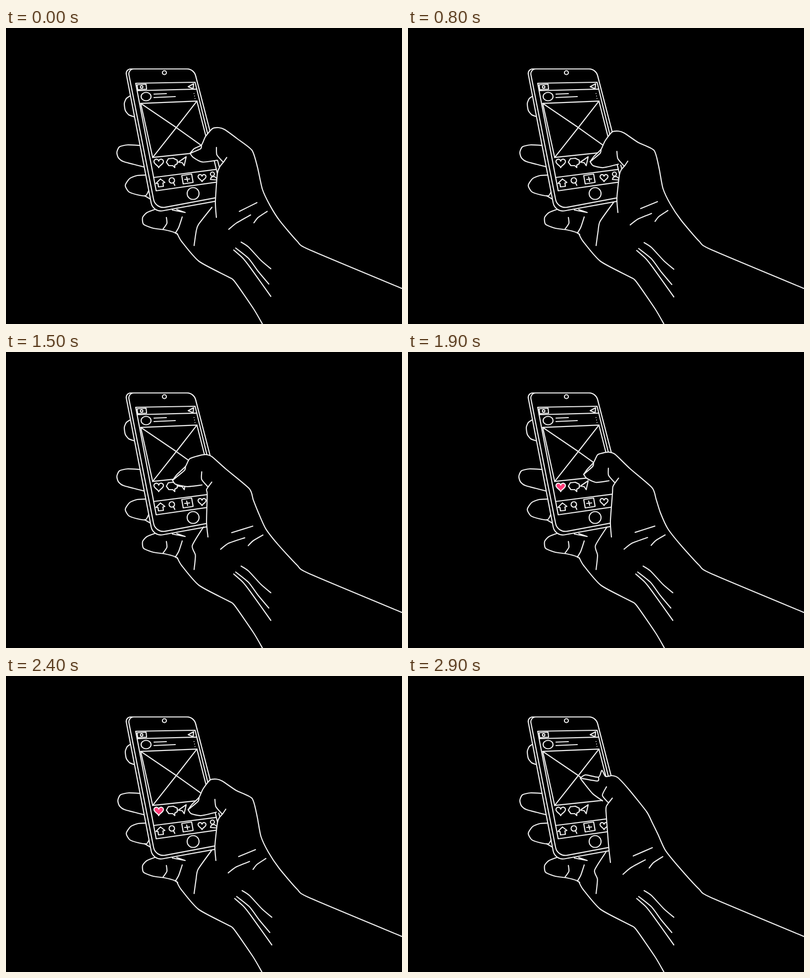
These frames come from a looping animation (800x600 px, 3 s). An HTML page with a canvas:

```html
<!DOCTYPE html>
<html lang="en">
<head>
<meta charset="utf-8">
<title>Scrolling hand</title>
<style>
  html, body { margin: 0; width: 100%; height: 100%; overflow: hidden; background: #000; }
  canvas { display: block; }
</style>
</head>
<body>
<canvas id="stage" width="800" height="600"></canvas>
<script>
const ctx = document.getElementById('stage').getContext('2d');
const INK = '#f0f0f0', PINK = '#ff3b78', STEP = 100, COUNT = 30, PITCH = 173;

const points = s => s.split(' ').map(p => p.split(',').map(Number));
const mix = (a, b, k) => a + (b - a) * k;

// The hand is drawn once, at rest.
const HAND = {
  top: points('368,271 376,260 390,246 398,229 412,211 425,209 437,213 465,232 497,248 507,283 515,325 530,357 552,390'),
  under: points('368,271 374,279 394,283 425,276'),
  palm: points('438,279 431,287 427,298 422,345 424,374')
};
const CREASES = ['422,250 424,265 436,279', '444,270 438,279', '368,271 388,254 390,246', '470,366 504,352',
  '449,399 465,387 492,376', '499,392 507,382 525,370', '415,354 388,392 384,412 380,441'].map(points);
const ARM = points('588,432 612,449 800,528');
const WRIST = '346,417 355,433 390,473 450,505 462,514 500,569 518,600';
const TENDONS = ['475,434 490,444 515,471 535,488', '460,450 478,466 493,485 535,544',
  '464,446 490,467 510,494 531,519'];
const FINGERS = [
  '250,138 243,143 239,153 241,167 248,176 259,180',
  '271,238 245,237 229,241 224,252 227,263 238,271 280,282',
  '284,298 265,299 250,305 241,319 248,332 265,338 282,340 288,330'
];

// Handles: tip, bend, knuckle, back, shoulder, wrist, web, palm, heel.
const POSES = {
  rest:   points('368,271 390,246 425,209 465,232 497,248 515,325 430,277 427,298 424,374'),
  settle: points('372,254 395,237 430,202 468,225 497,248 518,327 432,269 427,295 425,384'),
  swipe:  points('348,234 378,224 411,207 452,233 484,268 508,324 399,262 407,290 412,375'),
  high:   points('348,207 385,205 412,202 447,231 482,275 505,321 398,254 400,275 409,378'),
  reach:  points('355,248 375,224 406,203 448,236 493,275 510,326 411,262 413,287 411,375'),
  press:  points('318,272 350,240 402,213 440,238 490,279 510,326 391,279 400,290 405,375')
};
const ANCHORS = [ARM[0], [380, 441]];
const KEYS = [[0, 'settle'], [1, 'rest'], [2, 'rest'], [4, 'swipe'], [6, 'high'], [7, 'settle'],
  [8, 'rest'], [12, 'rest'], [14, 'reach'], [16, 'press'], [18, 'press'], [19, 'reach'],
  [21, 'rest'], [25, 'rest'], [27, 'swipe'], [29, 'high'], [30, 'settle']];

function poseAt(f) {
  const i = KEYS.findIndex((key, n) => f < KEYS[n + 1][0]);
  const [from, a] = KEYS[i], [to, b] = KEYS[i + 1], k = (f - from) / (to - from);
  return POSES[a].map(([x, y], n) => [mix(x, POSES[b][n][0], k), mix(y, POSES[b][n][1], k)]);
}

// Near handles drag a point along with them; anchors hold it back.
function warp(path, pose) {
  const rest = POSES.rest.concat(ANCHORS), now = pose.concat(ANCHORS);
  return path.map(([x, y]) => {
    let dx = 0, dy = 0, sum = 0;
    rest.forEach(([hx, hy], i) => {
      const w = 1 / (Math.hypot(x - hx, y - hy) ** 4 + 1e-6);
      dx += w * (now[i][0] - hx);
      dy += w * (now[i][1] - hy);
      sum += w;
    });
    return [x + dx / sum, y + dy / sum];
  });
}

function trace(pts, join) {
  if (join) ctx.lineTo(...pts[0]); else ctx.moveTo(...pts[0]);
  for (let i = 0; i < pts.length - 1; i++) {
    const b = pts[i], c = pts[i + 1], a = pts[i - 1] || b, d = pts[i + 2] || c;
    ctx.bezierCurveTo(b[0] + (c[0] - a[0]) / 9, b[1] + (c[1] - a[1]) / 9,
      c[0] - (d[0] - b[0]) / 9, c[1] - (d[1] - b[1]) / 9, ...c);
  }
}

function curve(p) {
  ctx.beginPath();
  trace(typeof p === 'string' ? points(p) : p);
  ctx.stroke();
}

function poly(p, close) {
  ctx.beginPath();
  (typeof p === 'string' ? points(p) : p).forEach(q => ctx.lineTo(...q));
  if (close) ctx.closePath();
  ctx.stroke();
}

function oval(x, y, rx, ry = rx) {
  ctx.beginPath();
  ctx.ellipse(x, y, rx, ry, 0, 0, 7);
  ctx.stroke();
}

function heart(x, y, size, fill) {
  ctx.beginPath();
  for (let a = 0; a < 6.28; a += .2) {
    ctx.lineTo(x + size * 16 * Math.sin(a) ** 3, y - size *
      (13 * Math.cos(a) - 5 * Math.cos(2 * a) - 2 * Math.cos(3 * a) - Math.cos(4 * a)));
  }
  ctx.closePath();
  if (fill) { ctx.fillStyle = fill; ctx.fill(); }
  ctx.stroke();
}

// Quad with a radius for each corner.
function slab(corners, radii) {
  const [a, b] = corners;
  ctx.beginPath();
  ctx.moveTo((a[0] + b[0]) / 2, (a[1] + b[1]) / 2);
  for (let i = 1; i <= 4; i++) ctx.arcTo(...corners[i % 4], ...corners[(i + 1) % 4], radii[i % 4]);
  ctx.closePath();
  ctx.fillStyle = '#000';
  ctx.fill();
  ctx.stroke();
}

// Screen coordinates: u runs across, v is the height on the left edge.
function spot(u, v) {
  const d = v - 112;
  return [mix(262 + .19 * d, 382 + .225 * d, u), mix(v, 110 + .925 * d, u)];
}
const row = v => poly([spot(0, v), spot(1, v)]);

function drawPost(shift, lag, liked) {
  const corners = [spot(.02, 153 + shift), spot(.955, 153 + shift),
    spot(.965, 263 + shift), spot(.045, 263 + shift)];
  const middle = spot(.52, 206.5 + shift + lag);
  poly(corners, true);
  corners.forEach(c => poly([c, middle]));
  ctx.save();
  ctx.translate(.21 * shift, .98 * shift);
  oval(283, 139, 10, 8.5);
  poly('299,134 324,133');
  poly('299,141 342,139');
  ctx.fillStyle = INK;
  for (let i = 0; i < 3; i++) ctx.fillRect(379 + i, 132 + 5 * i, 1.6, 1.6);
  heart(308.5, 273, .6, liked && PINK);
  poly('324,272 328,265 338,264 346,268 346,275 341,278 341,283 337,279 329,279', true);
  poly('364,261 348,272 356,273 360,279', true);
  ctx.restore();
}

function drawPhone(scroll, liked) {
  slab(points('241,83 379.5,83 446,347 297,374'), [9, 18, 20, 20]);
  slab(points('246,83 379.5,83 446,340 302,367'), [10, 18, 20, 20]);
  oval(320, 90.5, 4);

  ctx.save();
  ctx.beginPath();
  [[0, 127], [1, 127], [1, 303], [0, 303]].forEach(q => ctx.lineTo(...spot(...q)));
  ctx.clip();
  const lag = 12 * Math.sin(Math.PI * scroll);
  drawPost(-scroll * PITCH, lag, liked);
  if (scroll) drawPost((1 - scroll) * PITCH, lag, false);
  ctx.restore();

  poly([spot(0, 112), spot(1, 112), spot(1, 330), spot(0, 330)], true);
  row(127);
  row(303);
  poly('265,115 283,114 284,124 266,125', true);
  oval(274, 119.5, 2.5);
  poly('379,113 368,119 378,123', true);

  poly('312,306 303,315 307,315 308,322 318,321 317,314 321,313', true);
  oval(335, 309, 5.5);
  poly('338,313 341,319');
  poly('355,299 375,296 378,313 358,316', true);
  poly('361,307 371,306');
  poly('365,302 367,311');
  heart(396, 303, .5);
  oval(417, 296, 4);
  poly('413,307 415,302 421,301 426,305 426,308', true);
  oval(378, 335.5, 12);
}

function drawBack(drift) {
  ctx.save();
  ctx.translate(drift, 0);
  FINGERS.forEach(curve);
  ctx.restore();
  poly('280,340 292,347');
  curve('303,367 285,374 276,384 278,398 298,406 320,409 342,415 347,419');
  curve('324,384 325,396 317,408');
  curve('356,383 349,404 342,416');
}

function drawHand(pose, drift) {
  const top = warp(HAND.top, pose).concat(ARM);
  const under = warp(HAND.under, pose), palm = warp(HAND.palm, pose);
  ctx.beginPath();
  trace(top);
  [[800, 600], [500, 600]].forEach(q => ctx.lineTo(...q));
  trace([...palm].reverse(), true);
  trace([...under].reverse(), true);
  ctx.fillStyle = '#000';
  ctx.fill();
  [top, under, palm].forEach(curve);
  CREASES.forEach(c => curve(warp(c, pose)));
  ctx.save();
  ctx.translate(-drift / 2, 0);
  curve(WRIST);
  ctx.translate(drift * 1.5, drift / 2);
  TENDONS.forEach(curve);
  ctx.restore();
}

function draw(f) {
  // The line work shifts a little while the thumb rests.
  const drift = f < 8 || f > 12 && f < 21 ? 0 : 2;
  // Two swipes: each starts slowly and brings in the next post.
  const k = Math.min(1, Math.max(0, (f < 7 ? f - 2 : f - 25) / 4));
  ctx.fillStyle = '#000';
  ctx.fillRect(0, 0, 800, 600);
  ctx.strokeStyle = INK;
  ctx.lineWidth = 2.2;
  ctx.lineCap = ctx.lineJoin = 'round';
  drawBack(drift);
  drawPhone(mix(k * k * (3 - 2 * k), k, .2) + .02 * Math.sin(Math.PI * k), f >= 17);
  poly('336,369 362,374 345,368');
  drawHand(poseAt(f), drift);
}

let start;
function tick(now) {
  start ??= now;
  draw(Math.floor((now - start) / STEP) % COUNT);
  requestAnimationFrame(tick);
}
draw(0);
requestAnimationFrame(tick);
</script>
</body>
</html>
```
